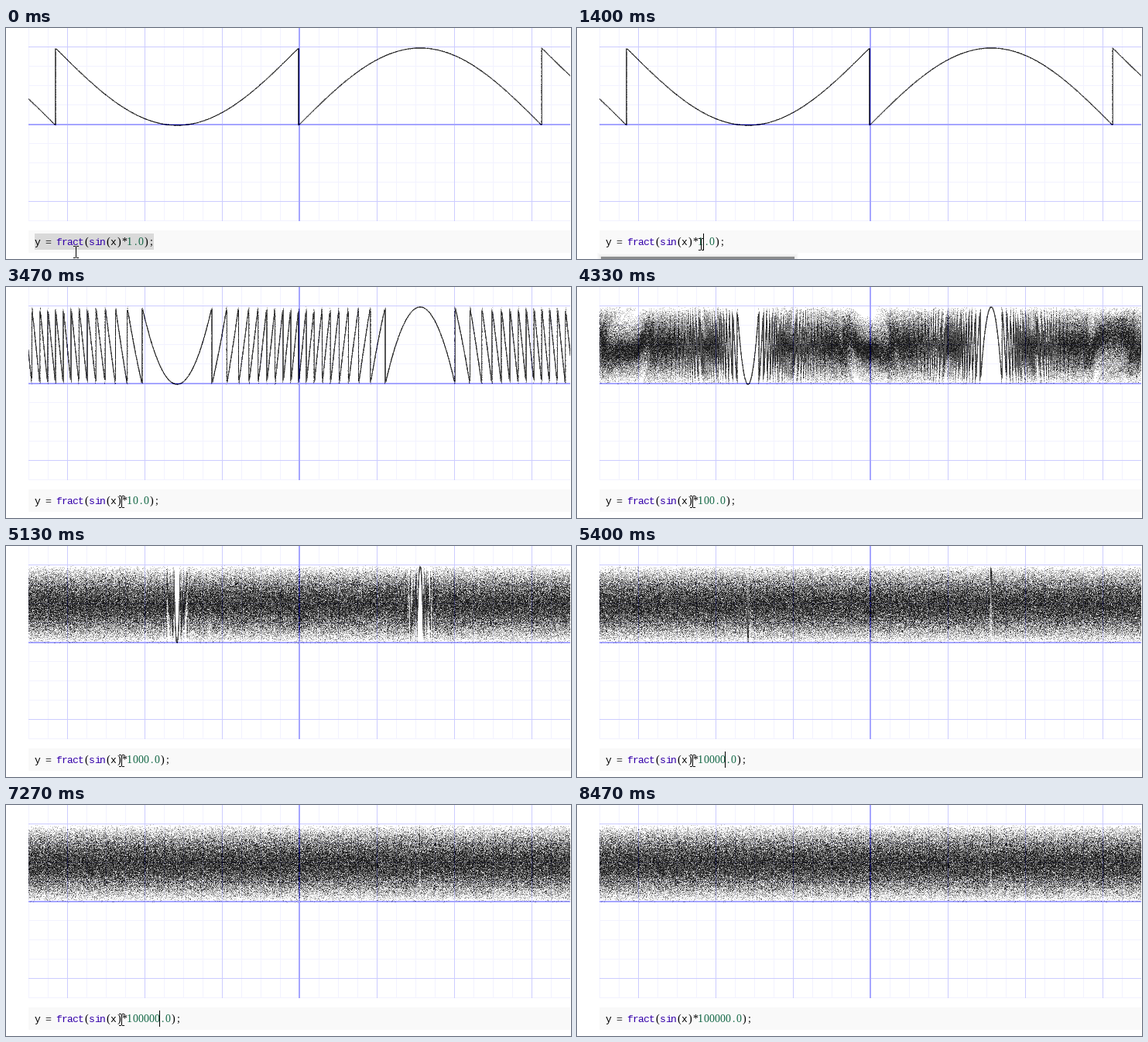
These frames come from a looping animation (730 px wide and 299 px high, 8.67 s). A matplotlib script:

```python
import numpy as np
import matplotlib.pyplot as plt
from matplotlib.animation import FuncAnimation
from matplotlib.collections import PolyCollection
from matplotlib.patches import Rectangle

W, H, DPI = 730, 299, 100
LOOP, STEP = 8670, 30
PLOT_X, PLOT_W, PLOT_H = 29, 700, 250
UNIT = 100                      # pixels per unit of x and y
LINE_W, JITTER, SAMPLES = 0.0225, 0.5, 3

TEXT_X, BASELINE, CELL = 37, 281, 7
LINE_TOP, LINE_H = 266, 21
INK, NAME, NUMBER = "black", "#3300aa", "#116644"
LETTERS = ("Liberation Mono", 13)
SYMBOLS = ("Liberation Serif", 14)

CLICK, CLOSE, BLUR = 1400, 1870, 8470
TYPED = (2930, 3800, 4600, 5400, 6200)
BLINK = 533

# start time -> pointer position (stem x, top y)
POINTER = [
    (0, (90, 282)), (70, (99, 280)), (130, (115, 277)), (200, (131, 274)),
    (270, (141, 272)), (400, (144, 272)), (800, (150, 275)), (870, (157, 277)),
    (1070, (159, 274)), (1130, (160, 272)), (1600, (166, 272)),
    (2200, (160, 272)), (2270, (153, 271)), (2400, (149, 270)),
    (7800, (144, 277)), (7870, (133, 288)), (7930, (133, H + 50)),
]
POPUP = [(0, 0), (1400, 0.5), (1470, 1), (1870, 0.5), (2000, 0)]


def at(track, t):
    return [value for start, value in track if start <= t][-1]


def rand(x, y):
    return np.sin(x * 12.9898 + y * 78.233) * 43758.5453 % 1


def grid():
    """Amount of light the grid takes away, per pixel."""
    dx = np.arange(PLOT_W)[None, :] - PLOT_W // 2
    dy = PLOT_H // 2 - 1 - np.arange(PLOT_H)[:, None]
    dark = np.zeros((PLOT_H, PLOT_W))
    for step, shade in ((UNIT // 4, 0.05), (UNIT, 0.20)):
        dark[(dx % step == 0) | (dy % step == 0)] = shade
    dark[(dx == 0) | (dx == -1) | (dy == 0) | (dy == -1)] = 0.35
    return dark[..., None] * np.array([1, 1, 0])


def plot(factor):
    """Jittered multisample plot of fract(sin(x) * factor)."""
    x = (np.arange(PLOT_W)[None, :] + 0.5 - PLOT_W / 2) / UNIT
    y = (PLOT_H / 2 - 0.5 - np.arange(PLOT_H)[:, None]) / UNIT
    d = LINE_W / SAMPLES
    count = np.zeros((PLOT_H, PLOT_W))
    for i in range(SAMPLES):
        for j in range(SAMPLES):
            ii = i + JITTER * rand(x + i * d, y + j * d)
            jj = j + JITTER * rand(y + i * d, x + j * d)
            f = np.sin(x + ii * d) * factor % 1
            count += np.where(f > y + jj * d, 1, -1)
    return np.abs(count) / SAMPLES ** 2


GRID = grid()
GRAPHS = [np.clip(plot(10.0 ** k)[..., None] - GRID, 0, 1)
          for k in range(len(TYPED) + 1)]

fig = plt.figure(figsize=(W / DPI, H / DPI), dpi=DPI, facecolor="white")
ax = fig.add_axes([0, 0, 1, 1])
graph = ax.imshow(GRAPHS[0], extent=(PLOT_X, PLOT_X + PLOT_W, PLOT_H, 0),
                  interpolation="nearest", aspect="auto")
ax.set(xlim=(0, W), ylim=(H, 0))
ax.axis("off")


def box(x, y, w, h, color, z):
    return ax.add_patch(Rectangle((x, y), w, h, fc=color, lw=0, zorder=z,
                                  antialiased=False))


box(PLOT_X, 262, PLOT_W, 29, "#f9f9f9", 1)
selection = box(TEXT_X, LINE_TOP, 22 * CELL, LINE_H, "#d9d9d9", 2)
caret = box(0, LINE_TOP, 1, LINE_H, "black", 4)
popup = [box(26 + k, 291 + k, 260 - 2 * k, 20, (0, 0, 0), 5) for k in range(5)]
popup.append(box(31, 296, 250, 20, "#2e3033", 6))
POPUP_ALPHA = [0.03] * 5 + [1]

cells = [ax.text(TEXT_X + (c + 0.5) * CELL, BASELINE, "", ha="center",
                 va="baseline", zorder=3) for c in range(27)]


def rect(x, y, w, h):
    return [(x, y), (x + w, y), (x + w, y + h), (x, y + h)]


BEAM = np.array([rect(0, 1, 1, 14), rect(-3, 0, 3, 1), rect(1, 0, 3, 1),
                 rect(-3, 15, 3, 1), rect(1, 15, 3, 1)])
pointer = PolyCollection(BEAM, facecolors="black", linewidths=0,
                         antialiaseds=False, zorder=7)
ax.add_collection(pointer, autolim=False)


def set_code(zeros):
    spans = [("y = ", INK), ("fract", NAME), ("(", INK), ("sin", NAME),
             ("(x)*", INK), ("1" + "0" * zeros + ".0", NUMBER), (");", INK)]
    chars = [(ch, color) for text, color in spans for ch in text]
    chars += [("", INK)] * (len(cells) - len(chars))
    for cell, (ch, color) in zip(cells, chars):
        family, px = LETTERS if ch.isalpha() else SYMBOLS
        cell.set(text=ch.strip(), color=color, family=family,
                 size=px * 72 / DPI)


def update(i):
    t = i * STEP + 20
    zeros = sum(start <= t for start in TYPED)
    graph.set_data(GRAPHS[zeros])
    set_code(zeros)
    selection.set_visible(t < CLICK)

    restarts = [s for s in (CLICK, CLOSE) + TYPED if s <= t]
    caret.set_visible(bool(restarts) and t < BLUR
                      and (t - restarts[-1]) // BLINK % 2 == 0)
    caret.set_x(TEXT_X + (18 + zeros) * CELL)

    shown = at(POPUP, t)
    for part, alpha in zip(popup, POPUP_ALPHA):
        part.set_alpha(alpha * shown)
        part.set_visible(shown > 0)

    pointer.set_verts(BEAM + np.array(at(POINTER, t)))
    return [graph, selection, caret, pointer, *popup, *cells]


anim = FuncAnimation(fig, update, frames=LOOP // STEP, interval=STEP,
                     repeat=True, repeat_delay=0, cache_frame_data=False)
plt.show()
```
